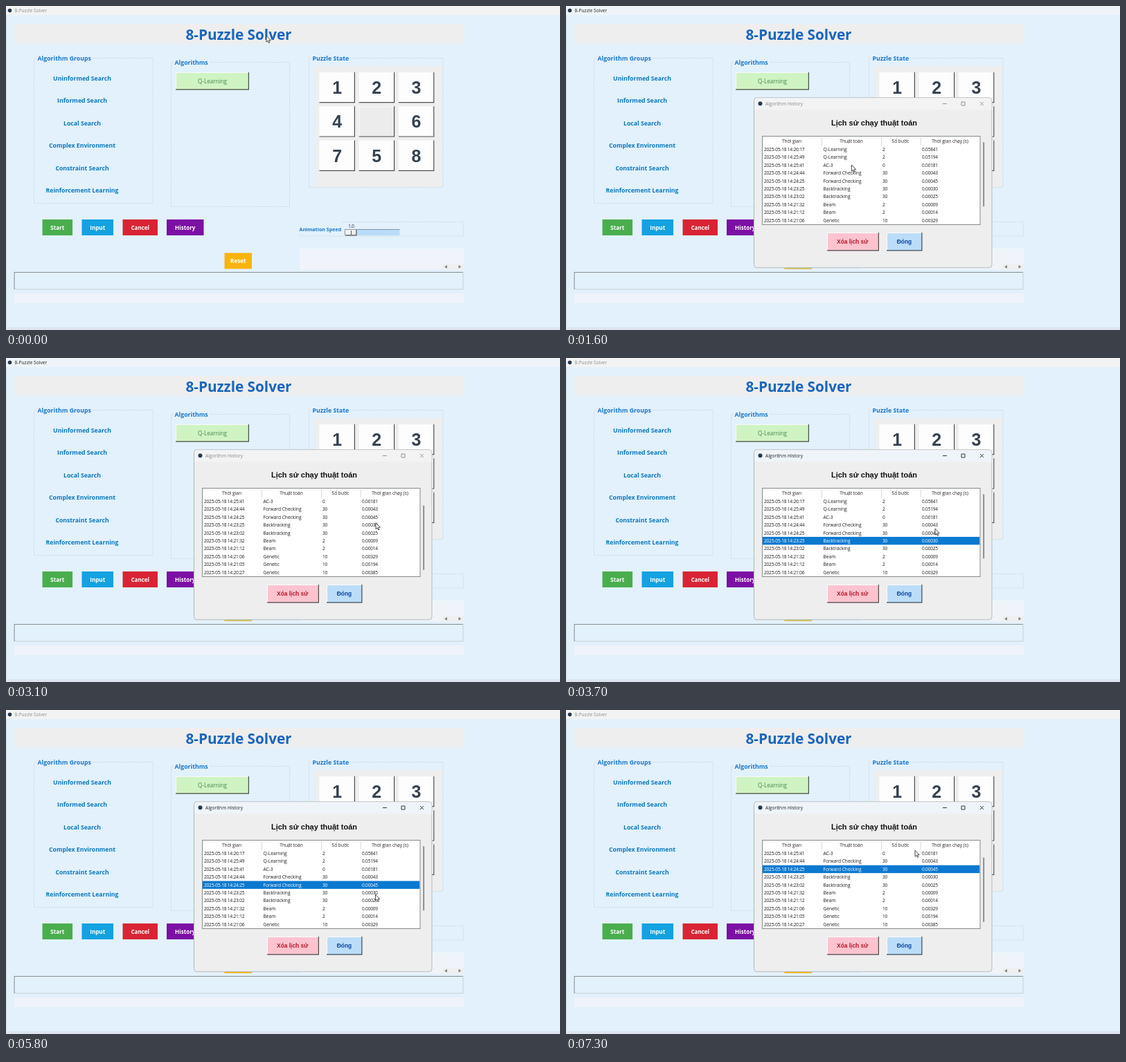
Write an HTML page that moves like this. It is 800 px wide and 469 px high and loops after 7.4 s.

```html
<!DOCTYPE html>
<html lang="en">
<head>
<meta charset="utf-8">
<title>8-Puzzle Solver</title>
<style>
html, body { margin: 0; width: 100%; height: 100%; overflow: hidden; background: #e2f1fb; }
svg { display: block; width: 100%; height: 100%; }
text { font-family: "Open Sans", "Noto Sans", sans-serif; white-space: pre; }
.b { font-weight: 700; }
.arial { font-family: "Liberation Sans", Arial, sans-serif; font-weight: 700; }
.num { letter-spacing: -.21px; }
</style>
</head>
<body>
<svg id="stage" viewBox="0 0 800 469"></svg>
<script>
const NS = "http://www.w3.org/2000/svg";
const LOOP = 7400, STEP = 100;
const stage = document.getElementById("stage");

function add(parent, tag, attrs, content) {
  const el = document.createElementNS(NS, tag);
  for (const k in attrs) el.setAttribute(k, attrs[k]);
  if (content !== undefined) el.textContent = content;
  parent.appendChild(el);
  return el;
}
const rect = (p, x, y, w, h, fill, more) => add(p, "rect", { x, y, width: w, height: h, fill, ...more });
const path = (p, d, stroke, width = 1, more) =>
  add(p, "path", { d, fill: "none", stroke, "stroke-width": width, ...more });
const text = (p, str, x, y, size, fill, cls = "", anchor = "start") =>
  add(p, "text", { x, y, "font-size": size, fill, class: cls, "text-anchor": anchor }, str);

// Raised Tk-style box: light top/left, dark right/bottom
function raised(p, x, y, w, h, fill, dark = "#4c4c4c") {
  rect(p, x, y, w, h, fill);
  path(p, `M${x + .5} ${y + h}V${y + .5}H${x + w}`, "#fafafa");
  path(p, `M${x} ${y + h - .6}H${x + w - .6}V${y}`, dark, 1.2);
}

function group(p, x, y, w, h, label, textW) {
  path(p, `M${x + 3} ${y}H${x}V${y + h}H${x + w}V${y}H${x + textW + 7}`, "#cfdbe3", 1,
    { "stroke-dasharray": "2 1" });
  text(p, label, x + 5, y + 3.5, 8.75, "#1976c9", "b");
}

function flatButton(p, label, x, y, w, fill) {
  rect(p, x, y, w, 23, fill);
  text(p, label, x + w / 2, y + 14.5, 8.05, "#fff", "b", "middle");
}

function drawMain(p) {
  rect(p, 0, 0, 800, 469, "#e2f1fb");
  const bar = rect(p, 0, 0, 800, 13, "#f3f3f3");
  rect(p, 0, 13, 1, 452, "#cfdde6");
  rect(p, 0, 465, 800, 4, "#dde4f0");
  add(p, "circle", { cx: 5.5, cy: 6.5, r: 2.8, fill: "#24384f" });
  const title = text(p, "8-Puzzle Solver", 12.5, 9.2, 6.7, "#8c8c8c");

  rect(p, 12, 26, 650, 29.5, "#eeeeee");
  text(p, "8-Puzzle Solver", 336, 48.6, 20.7, "#1a66c0", "b", "middle");

  group(p, 40.5, 75.5, 171.5, 210, "Algorithm Groups", 78);
  ["Uninformed Search", "Informed Search", "Local Search", "Complex Environment",
    "Constraint Search", "Reinforcement Learning"].forEach((s, i) =>
    text(p, s, 110, 107.8 + i * 32.5, 8.7, "#0b78bd", "b", "middle"));

  group(p, 238.5, 81.5, 171, 209, "Algorithms", 49);
  raised(p, 245, 96, 106, 25.5, "#cff3c2");
  text(p, "Q-Learning", 298, 111.7, 8.1, "#43874a", "", "middle");

  group(p, 437.5, 75.5, 193.5, 187, "Puzzle State", 54);
  rect(p, 446, 87, 184, 175, "#eeeeee");
  [..."1234 6758"].forEach((c, i) => {
    const x = 452.5 + (i % 3) * 57.2, y = 96 + Math.floor(i / 3) * 49.3;
    raised(p, x, y, 51.5, 44.3, c === " " ? "#ececec" : "#fdfdfd");
    text(p, c, x + 25.6, y + 31, 25, "#34424f", "arial", "middle");
  });

  flatButton(p, "Start", 52.5, 309, 43.5, "#4aae4e");
  flatButton(p, "Input", 109.5, 309, 45.5, "#14a2e1");
  flatButton(p, "Cancel", 168.5, 309, 50.5, "#d82434");
  flatButton(p, "History", 232, 309, 53.5, "#7d10a4");
  flatButton(p, "Reset", 315.5, 357.5, 39.5, "#f8b30e");

  path(p, "M486 312.5H660.5V333H424V330", "#cfdbe3", 1, { "stroke-dasharray": "2 1" });
  text(p, "Animation Speed", 423.5, 325.8, 7.15, "#1976c9", "b");
  text(p, "1.0", 498.5, 320.5, 6.4, "#222", "num", "middle");
  rect(p, 489, 323, 79.5, 9, "#badcf8");
  path(p, "M489.5 332V323.5H568.5", "#8496a5");
  raised(p, 490, 324, 16.5, 8.5, "#f0f0f0");
  path(p, "M498.5 325V331", "#555");

  rect(p, 424, 351, 237, 30.5, "#f0f4fa");
  rect(p, 631, 373.5, 30, 8, "#efefef");
  add(p, "path", { d: "M637 375v5l-4-2.5zM653.5 375v5l4-2.5z", fill: "#858585" });

  path(p, "M12 410H660V386", "#c5d0d8");
  path(p, "M12 410V385.5H660", "#858c92");
  rect(p, 12, 416.5, 649, 13.5, "#f0f4fa");
  return { bar, title };
}

const Q = "Q-Learning", FC = "Forward Checking", BT = "Backtracking";
const runs = [
  ["26:17", Q, 2, "05841"], ["25:49", Q, 2, "05194"], ["25:41", "AC-3", 0, "00181"],
  ["24:44", FC, 30, "00043"], ["24:25", FC, 30, "00045"],
  ["23:25", BT, 30, "00030"], ["23:02", BT, 30, "00025"],
  ["21:32", "Beam", 2, "00009"], ["21:12", "Beam", 2, "00014"],
  ["21:06", "Genetic", 10, "00329"], ["21:05", "Genetic", 10, "00194"],
  ["20:27", "Genetic", 10, "00385"]
];
const ROW = 11.4;

function drawDialog(p) {
  const residue = rect(p, 315.5, 378, 39.5, 3, "#f8b30e");
  rect(p, 271.5, 132.8, 343.5, 246, "#eeeeee", { rx: 4, stroke: "#b4b9bd" });
  const bar = add(p, "path", { d: "M272 150.500V137q0-3.700 4-3.700H610.500q4 0 4 3.700V150.500z", fill: "#f3f3f3" });
  add(p, "circle", { cx: 280.5, cy: 141.3, r: 3, fill: "#24384f" });
  const title = text(p, "Algorithm History", 288, 143.9, 6.6, "#888");
  const icons = path(p, "M544 141.5h6M571 139h5v5h-5zM598 139l5 5M603 139l-5 5", "#888", .9);
  text(p, "Lịch sử chạy thuật toán", 445, 173, 11, "#111", "arial", "middle");

  rect(p, 283.5, 188.5, 314.5, 128, "#fff", { stroke: "#858a91" });
  [369.5, 455.5, 512].forEach(x => path(p, `M${x} 190V202`, "#d8d8d8"));
  [["Thời gian", 326], ["Thuật toán", 412], ["Số bước", 483], ["Thời gian chạy (s)", 554.5]]
    .forEach(([s, x]) => text(p, s, x, 197.6, 6.6, "#222", "", "middle"));

  const clip = add(add(p, "defs", {}), "clipPath", { id: "view" });
  rect(clip, 284, 202, 313.5, 114, "#fff");
  const list = add(add(p, "g", { "clip-path": "url(#view)" }), "g", {});
  const rows = runs.map(([time, name, steps, secs], i) => {
    const g = add(list, "g", {}), y = 207.6 + i * ROW;
    const back = rect(g, 284, y - ROW / 2, 313.5, ROW, "#0b79d0");
    const cells = add(g, "g", {});
    const cell = (s, x, cls) => add(cells, "text", { x, y: y + 2.4, "font-size": 6.6, class: cls }, s);
    cell("2025-05-18 14:" + time, 286, "num");
    cell(name, 371.5, "");
    cell(steps, 457, "num");
    cell("0." + secs, 514, "num");
    return { back, cells };
  });
  const thumb = rect(p, 602.3, 197, 1.8, 93.5, "#858585", { rx: .9 });

  raised(p, 377, 328, 75, 26.5, "#fdc3ce");
  text(p, "Xóa lịch sử", 413.7, 344.2, 8.4, "#b2182b", "arial", "middle");
  raised(p, 463, 328, 51.5, 26.5, "#bbddf9");
  text(p, "Đóng", 488.5, 344.2, 8.4, "#0d47a1", "arial", "middle");
  return { residue, bar, title, icons, list, rows, thumb };
}

const main = drawMain(add(stage, "g", {}));
const dialogBox = add(stage, "g", {});
const dialog = drawDialog(dialogBox);
const cursor = add(stage, "path", {
  d: "M0 0V9.200L2.100 7.300L3.500 10.400L4.900 9.800L3.500 6.700H6.300Z",
  fill: "#fff", stroke: "#222", "stroke-width": .8
});

// time, x, y of the pointer tip
const route = [
  [0, 376, 43], [800, 258, 317], [1100, 258, 317], [1600, 412.5, 230], [2200, 534, 240],
  [3100, 534, 238.5], [3400, 533, 262], [3500, 533, 262], [3700, 533, 247], [4400, 532.5, 215.5],
  [4800, 532.5, 215.5], [5300, 533, 251], [5500, 533, 251], [5800, 533.5, 267],
  [6900, 533, 256], [7300, 504, 203], [LOOP, 504, 203]
];
const scrolls = [[0, 0], [2400, 2], [3300, 0], [6700, 2]];
const picks = [[0, -1], [3500, 5], [4500, 1], [5400, 4]];

const latest = (steps, t) => steps.filter(s => s[0] <= t).pop()[1];

function pointerAt(t) {
  const i = route.findIndex((k, n) => n && t < k[0]);
  const [t0, x0, y0] = route[i - 1], [t1, x1, y1] = route[i];
  const u = (t - t0) / (t1 - t0), e = u * u * (3 - 2 * u);
  return [x0 + (x1 - x0) * e, y0 + (y1 - y0) * e];
}

function render(t) {
  const mainOn = t >= 1000 && t < 3500, dialogOn = t >= 3500;
  main.title.setAttribute("fill", mainOn ? "#222" : "#8c8c8c");
  main.bar.setAttribute("fill", mainOn ? "#eff4f9" : "#f3f3f3");

  dialogBox.setAttribute("visibility", t >= 1100 ? "visible" : "hidden");
  dialog.residue.setAttribute("fill", t < 4200 ? "#d9c250" : "#f8b30e");
  dialog.bar.setAttribute("fill", dialogOn ? "#eff4f9" : "#f3f3f3");
  dialog.title.setAttribute("fill", dialogOn ? "#222" : "#888");
  dialog.icons.setAttribute("stroke", dialogOn ? "#222" : "#888");

  const top = latest(scrolls, t), pick = latest(picks, t);
  dialog.list.setAttribute("transform", `translate(0 ${-top * ROW})`);
  dialog.thumb.setAttribute("y", 197 + top * 8.2);
  dialog.rows.forEach((r, i) => {
    r.back.setAttribute("opacity", i === pick ? 1 : 0);
    r.cells.setAttribute("fill", i === pick ? "#fff" : "#1c1c1c");
  });
  cursor.setAttribute("transform", `translate(${pointerAt(t)})`);
}

const start = performance.now();
function tick() {
  const t = (performance.now() - start) % LOOP;
  render(Math.floor(t / STEP) * STEP);
  requestAnimationFrame(tick);
}
tick();
</script>
</body>
</html>
```
